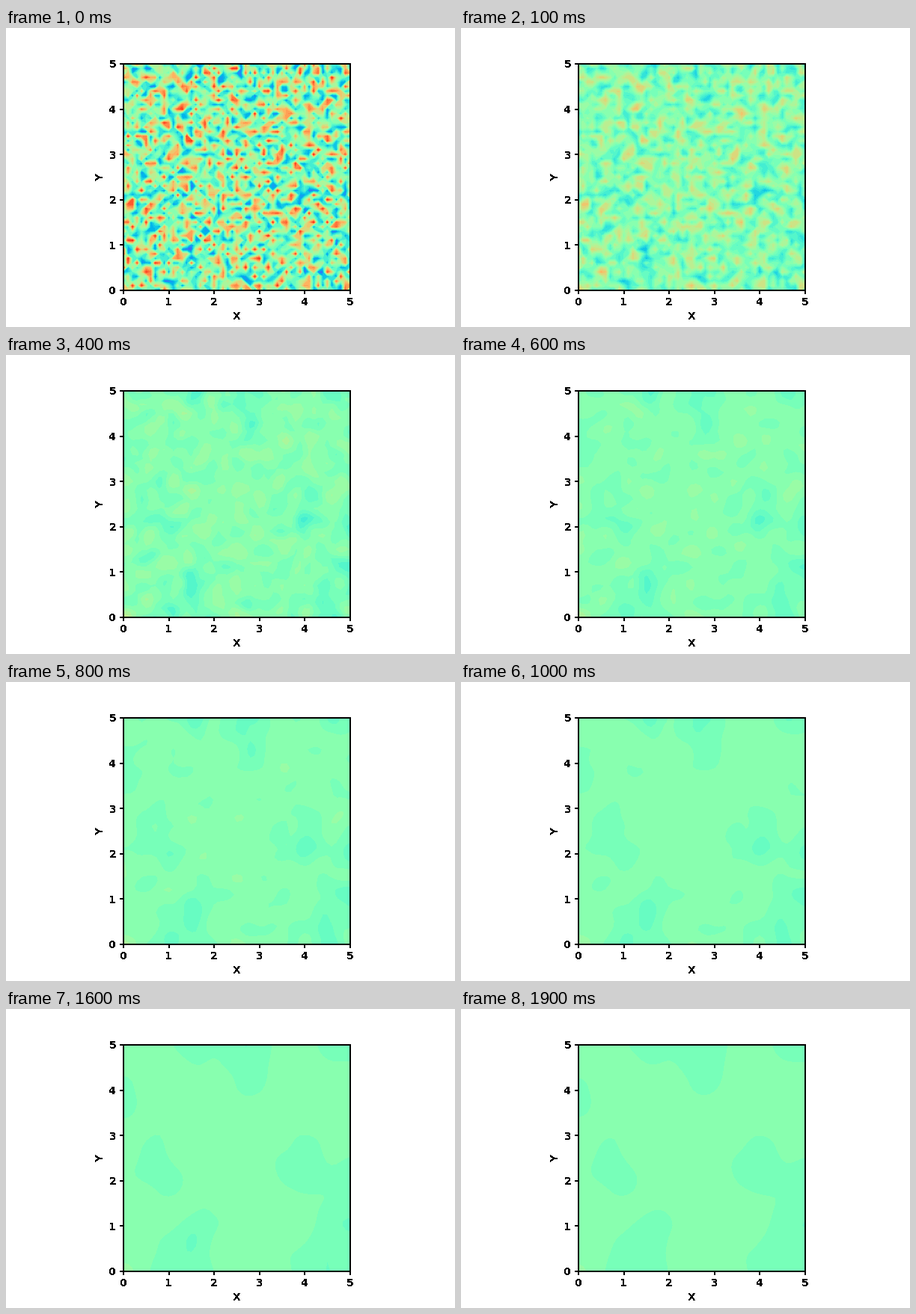
Write a matplotlib script that moves like this. It is 600x400 px and loops after 2000 ms.

```python
import numpy as np
import matplotlib.pyplot as plt
from matplotlib.animation import FuncAnimation

# Random field relaxing by heat diffusion on a square with insulated walls
SIZE, N, FRAMES = 5.0, 51, 20
H = SIZE / (N - 1)
RATE = 0.005          # growth of the squared blur width per frame
REF = 12 * RATE       # blur at which pool depths are quoted
WIDTH = 0.16          # starting width of a pool
MEAN, SPREAD = 0.513, 0.42
LEVELS = np.linspace(0, 1, 31)
axis = np.linspace(0, SIZE, N)

# Key points of the slow pattern: x, y, depth
POOLS = [
    (1.0, 0.2, 0.022), (1.5, 0.2, 0.022), (1.5, 0.75, 0.05),
    (4.0, 2.45, 0.032), (4.0, 2.1, 0.032), (5.0, 2.0, 0.017),
    (5.0, 1.1, 0.028), (4.5, 0.8, 0.016), (4.5, 0.2, 0.029),
    (4.0, 0.45, 0.025), (0.88, 2.1, 0.036), (0.58, 2.95, 0.021),
    (0.1, 4.15, 0.012), (1.55, 5.0, 0.02), (2.7, 4.9, 0.024),
    (2.75, 4.35, 0.034), (4.7, 5.0, 0.013), (2.45, 2.55, -0.0165),
    (0.0, 0.2, -0.006),
]

lap = -2 * np.eye(N) + np.eye(N, k=1) + np.eye(N, k=-1)
lap[0, 0] = lap[-1, -1] = -1
eig, vec = np.linalg.eigh(lap / H**2)


def blur(u, var):
    """Diffuse u by a heat kernel of the given variance."""
    k = (vec * np.exp(eig * var / 2)) @ vec.T
    return k @ u @ k.T


def bump(c):
    """Gaussian with its mirror images in the two walls."""
    return sum(np.exp(-((axis - m) / WIDTH) ** 2 / 2)
               for m in (c, -c, 2 * SIZE - c))


def start_field():
    noise = np.random.default_rng(5).uniform(-SPREAD, SPREAD, (N, N))
    field = MEAN + noise - blur(noise, 0.025)
    gain = 1 + REF / WIDTH**2
    for x, y, depth in POOLS:
        field -= depth * gain * np.outer(bump(y), bump(x))
    return field


start = start_field()

plt.rcParams["text.antialiased"] = False
fig = plt.figure(figsize=(6, 4), dpi=100, facecolor="white")
ax = fig.add_axes([157 / 600, 49.4 / 400, 302.6 / 600, 302.6 / 400])
ax.set(xlim=(0, SIZE), ylim=(0, SIZE), xticks=range(6), yticks=range(6))
ax.set_xlabel("X", fontsize=10, fontweight="bold", labelpad=3.3)
ax.set_ylabel("Y", fontsize=10, fontweight="bold", labelpad=3.3)
ax.tick_params(width=1.44, labelsize=10)
for label in ax.get_xticklabels() + ax.get_yticklabels():
    label.set_fontweight("bold")
for side in ax.spines.values():
    side.set_linewidth(1.44)


def draw(i):
    for old in list(ax.collections):
        old.remove()
    u = np.clip(blur(start, i * RATE), 0.12, 0.94)
    ax.contourf(axis, axis, u, levels=LEVELS, cmap="rainbow", vmin=0, vmax=1)
    return ax.collections


anim = FuncAnimation(fig, draw, frames=FRAMES, interval=100,
                     repeat=True, repeat_delay=0, blit=False)
plt.show()
```
